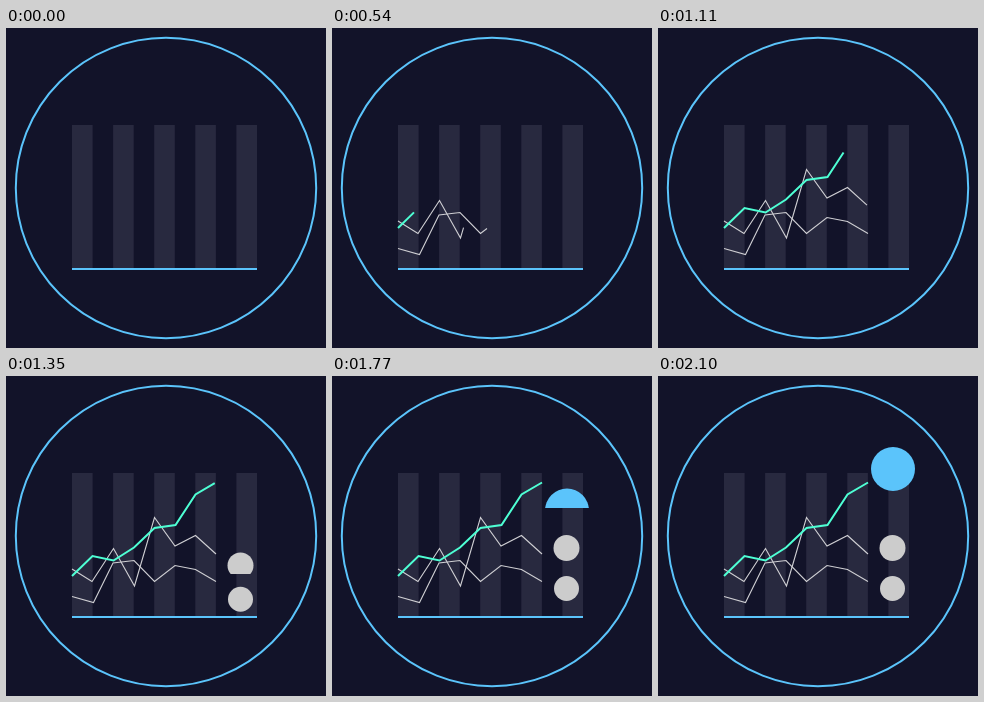
Write an HTML page that moves like this. It is 320 by 320 pixels and loops after 3180 ms.

```html
<!DOCTYPE html>
<html lang="en">
<head>
<meta charset="utf-8">
<title>Growth chart</title>
<style>
html, body { margin: 0; width: 100%; height: 100%; overflow: hidden; background: #121329; }
svg { display: block; width: 100%; height: 100%; }
</style>
</head>
<body>
<svg id="stage" viewBox="0 0 320 320">
  <circle cx="160" cy="160" r="150.2" fill="none" stroke="#5bc4fb" stroke-width="2"/>
  <g id="bars" fill="#28293f"></g>
  <path d="M66 241H251" stroke="#5bc4fb" stroke-width="2"/>
  <g id="lines" fill="none"></g>
  <g id="badges"></g>
</svg>
<script>
const LOOP = 3180, STEP = 30;
const clamp = v => Math.min(1, Math.max(0, v));
const easeOut = t => Math.sin(t * Math.PI / 2);
const easeInOut = t => (1 - Math.cos(t * Math.PI)) / 2;

function add(parent, tag, attrs) {
  const el = document.createElementNS('http://www.w3.org/2000/svg', tag);
  for (const key in attrs) el.setAttribute(key, attrs[key]);
  return parent.appendChild(el);
}

const [bars, lines, badges] = ['bars', 'lines', 'badges'].map(id => document.getElementById(id));

for (let i = 0; i < 5; i++)
  add(bars, 'rect', { x: 66 + i * 41.1, y: 97, width: 20.6, height: 143 });

const series = [
  { points: '66,220.5 87.5,226.5 107,187 128,184.5 148.5,205.5 169,189.5 189.5,193.5 210,205.5',
    color: '#cfcfd3', width: 1.1, start: 58, end: 1095, ease: easeOut },
  { points: '66,193 86,205.5 107.5,172.5 128.5,210 148.5,141.5 169,170 189.5,159.5 210,178',
    color: '#cfcfd3', width: 1.1, start: 280, end: 1168, ease: easeOut },
  { points: '66,200 86.5,180 107.5,184.5 128,171.5 148.5,152 169.5,149 189.5,118.5 210,106.5',
    color: '#4effd4', width: 2, start: 284, end: 1414, ease: easeInOut }
];
for (const s of series)
  s.el = add(lines, 'polyline', {
    points: s.points, stroke: s.color, 'stroke-width': s.width, pathLength: 1
  });

// Each badge rises from behind a floor line.
const marks = [
  { x: 234.5, y: 212.5, r: 12.5, floor: 238, color: '#cccccc', start: 1110, end: 1480 },
  { x: 234.5, y: 172, r: 13, floor: 198, color: '#cccccc', start: 1150, end: 1520 },
  { x: 235, y: 93, r: 22, floor: 132, color: '#5bc4fb', start: 1560, end: 2100 }
];
marks.forEach((m, i) => {
  const clip = add(badges, 'clipPath', { id: 'floor' + i });
  add(clip, 'rect', { x: 0, y: 0, width: 320, height: m.floor });
  const group = add(badges, 'g', { 'clip-path': `url(#floor${i})` });
  m.el = add(group, 'circle', { cx: m.x, r: m.r, fill: m.color });
});

const progress = (item, t, ease) => ease(clamp((t - item.start) / (item.end - item.start)));

function draw(t) {
  for (const s of series) {
    const p = progress(s, t, s.ease);
    s.el.setAttribute('visibility', p > 0 ? 'visible' : 'hidden');
    s.el.setAttribute('stroke-dasharray', p < 1 ? `${p} 2` : 'none');
  }
  for (const m of marks) {
    const from = m.floor + m.r + 1;
    m.el.setAttribute('cy', from + (m.y - from) * progress(m, t, easeInOut));
  }
}

const origin = performance.now();
function tick() {
  const t = (performance.now() - origin) % LOOP;
  draw(Math.floor(t / STEP) * STEP);
  requestAnimationFrame(tick);
}
tick();
</script>
</body>
</html>
```
